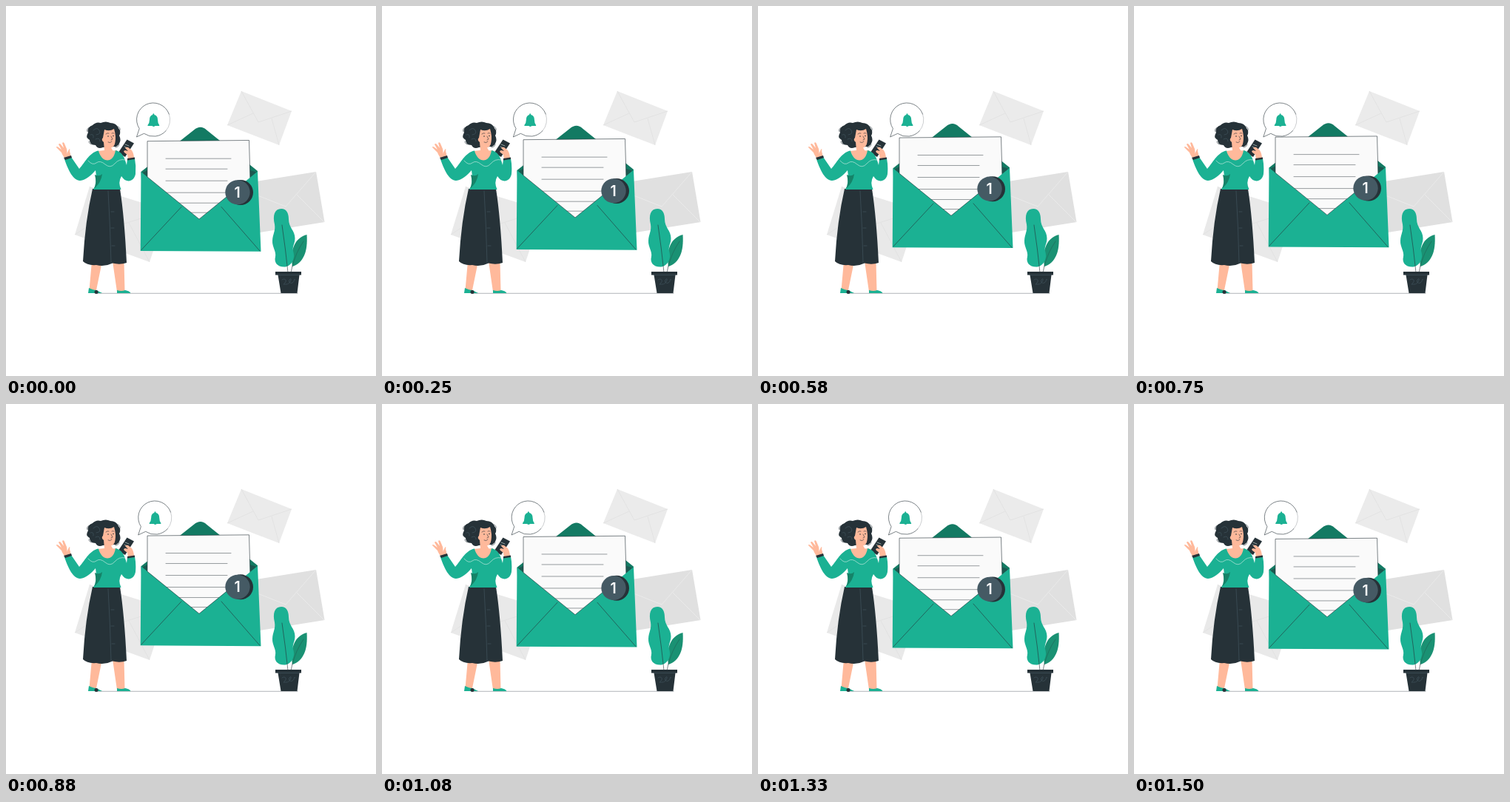
An HTML page for the animation above (1.54 s loop, 500x500 px).

```html
<!DOCTYPE html>
<html lang="en">
<head>
<meta charset="utf-8">
<title>New mail</title>
<style>
  html, body { margin: 0; height: 100%; overflow: hidden; background: #fff; }
  svg { display: block; width: 100vw; height: 100vh; }
  .line { fill: none; stroke: #263238; stroke-width: .6; stroke-linecap: round; stroke-linejoin: round; }
  .ink { fill: #263238; }
  .green { fill: #1bb193; }
  .skin { fill: #ffb99b; }
  .crease { fill: none; stroke: #ededed; stroke-width: .8; }
  .shade { stroke: #e0e0e0; }
  .dim { stroke: #455a64; }
  .pale { stroke: #d9efe8; }
</style>
</head>
<body>
<svg viewBox="0 0 500 500">
  <g id="backdrop">
    <path fill="#ebebeb" d="M318 115L386 142 369 188 299 161Z"/>
    <path class="crease shade" d="M318 115L341 157 386 142M299 161L334 145M369 188L359 152"/>
    <path fill="#e0e0e0" d="M332 238L419 224 430.500 292 343 306Z"/>
    <path class="crease" d="M419 224L378 271 335 254M430 292L393 255"/>
    <path fill="#e9e9e9" d="M113 244L217 276 194 346 93 309Z"/>
    <path class="crease shade" d="M113 244L151 297 217 276M194 346L166 293M93 309L138 279"/>
  </g>
  <path class="line" stroke-opacity=".6" d="M122 388.300H394"/>

  <g id="plant">
    <path class="line" d="M400 321Q389 338 385 360"/>
    <path fill="#1a9173" d="M406.500 309C408 332 402 347 387 352C384 333 388 314 406.500 309Z"/>
    <path class="line" stroke-opacity=".5" d="M402 318Q391 334 387 352"/>
    <path class="green" d="M372 274C379 274 382 280 382 288C382 300 390.500 303 390.500 314C390.500 322 386 325 388.500 333C391 342 385 352.500 376 352.500C366 352.500 362 346 364 339C365.500 331 359.500 326 360 317C360.500 308 364.500 304 363 295C360 283 363 274 372 274Z"/>
    <path class="line" d="M373 296Q378 330 381 360"/>
    <path class="ink" d="M364 359H399V363.500H396.500L393.500 388H371.500L367.500 363.500H364Z"/>
    <path class="line dim" d="M368 363.500H396M373 370C377 367 380 371 377 374S374 376 379 376S387 367 384 369S383 376 387 374S388 367 391 370"/>
  </g>

  <g id="woman">
    <path class="skin" d="M116 345H130L122 384H112.500ZM144 345H159.500L160.500 386H150Z"/>
    <path class="green" d="M112 381Q118 384 122 384L130 388H111ZM150 384Q156 386 161 384Q167 385 168.500 388H150Z"/>
    <circle class="ink" cx="122" cy="386.500" r="2.500"/>
    <path class="ink" d="M117 247H154Q160 285 163 347Q154 350 144 347.500Q133 353 122 350Q110 351 104 345Q107 290 117 247Z"/>
    <path class="line dim" d="M138 250Q141 300 142 347M142 278h4M142 300h4M143 324h4"/>
    <path class="skin" d="M88 204L80 207Q76 201 75 198L68 191Q68 189 71 191L75 194 71 187Q72 185 74 187L78 192 76 185Q78 183 79 186L82 193Q83 198 82 200L85 194Q87 191 86 196Z"/>
    <path class="ink" d="M163.500 180.500L173 185.500 161 204 151.500 198.500Z"/>
    <path class="line pale" d="M161 187l5 2M160 190l4 2"/>
    <path class="skin" d="M165 208L164 201 160 198Q158 196 161 195L165 196 161 192Q162 190 165 191L170 195Q173 200 173 207Z"/>
    <path class="ink" d="M117 161Q122 156 128 158Q135 155 141 158Q149 158 152 165Q156 170 153 175Q156 181 153 186Q150 191 146 190L131 191Q124 194 121 188Q113 188 113 181Q107 177 111 171Q109 164 117 161Z"/>
    <path class="line" d="M114 164q-6 1-4 6M112 180q-4-2-2-5M151 163q4 1 3 5M117 187q-5 0-5-4M153 187q-1 4-5 4"/>
    <path class="line dim" d="M118 168q5-5 8 0t-4 6M121 180q6-3 6 3M114 174q5-2 4 4"/>
    <path class="skin" d="M133 167Q140 170 146 166Q149 176 147.500 184Q146.500 191 142 191.500L144.500 195.500 150 195Q147 212 136 212Q125 211 124 196L133 195 132 184Q128 181 131 178Z"/>
    <path class="line" d="M135 173q2-2 4-1M143 172q2-1 3 0M142 176l2 4-2 1M138 184q3 2 5-1"/>
    <circle class="ink" cx="138" cy="176" r=".8"/><circle class="ink" cx="145" cy="175.500" r=".8"/>
    <path class="green" d="M125 195.500C112 198 106 213 99 220L88 204 79 207C84 222 91 236 100 236C108 235 115 229 121 222Q124 238 118 248H155.500Q151 238 156 230C162 240 173 238 175 227Q176 216 174 206L164 207 163 215C160 204 157 197 148 195C145 214 129 212 125 195.500Z"/>
    <path fill="#158368" d="M120 228Q126 231 130 227Q129 238 119 247Q123 239 120 228Z"/>
    <path class="ink" d="M78 205L88 202 89 205 80 208ZM164 206L174 204.500V207L164 208.500Z"/>
    <path class="line pale" d="M111 209Q117 216 122 212T134 214T147 213T161 208"/>
  </g>

  <g id="mail">
    <path fill="#137a63" d="M182.500 224L254 167.500Q263 160 271 167.500L340 223V236H183Z"/>
    <path class="ink" opacity=".45" d="M183 226L191 222V234ZM340 225L330 222V234Z"/>
    <path fill="#fafafa" d="M191 182.700L328.500 181.500 330 242 261 290 191 242Z"/>
    <path class="line" d="M191 231V182.700L328.500 181.500 330 232"/>
    <path class="line" stroke-opacity=".8" d="M216 206.200H304M216 220.200H299M216 236.200H299M214 252.200H299M230 266.200H291M246 279.200H274"/>
    <path class="green" d="M182.500 224L261 288 340 223.500 344.500 331.800 181.700 331Z"/>
    <path class="line" d="M191 231L261 288 306 251.500M183 329.500L237 271.500M343 331L291 271.500"/>
    <ellipse class="ink" cx="317" cy="252" rx="17" ry="17"/>
    <ellipse fill="#455a64" cx="313" cy="251.800" rx="16.700" ry="16.500"/>
    <text x="312.500" y="258.800" text-anchor="middle" font-family="Inter, sans-serif" font-weight="600" font-size="19.500" fill="#fff">1</text>
  </g>

  <g id="bubble">
    <circle fill="#fff" cx="199.300" cy="153.800" r="22.500"/>
    <path fill="#fff" d="M180 165.500L176.500 177 186.500 172.300Z"/>
    <path class="line" d="M220.300 146A22.500 22.500 0 1 0 180.200 165.700L176.500 177 186.500 172.300A22.500 22.500 0 0 0 216 168.800"/>
    <path class="line" stroke-opacity=".4" d="M220.300 146A22.500 22.500 0 0 1 216 168.800"/>
    <path class="green" d="M198.300 147V146Q199.300 144.500 200.300 146V147Q205 148 205 153.500Q205 158 207.200 161V162H201.500Q199.500 164 197.500 162H191.500V161Q194 158 194 153.500Q194 148 198.300 147Z"/>
  </g>
</svg>
<script>
const LOOP = 1540, PEAK = 720, LIFT = 5.8;
const shake = [0, -1, 2, -4, 4, -2.5, 4, -1.5, 1.5, -1, 0];
const mail = document.getElementById('mail');
const bubble = document.getElementById('bubble');

function draw() {
  const t = performance.now() % LOOP;
  const rise = t < PEAK ? t / PEAK : (LOOP - t) / (LOOP - PEAK);
  mail.setAttribute('transform', `translate(0 ${-LIFT * rise})`);

  const pos = t / LOOP * 10, i = Math.floor(pos);
  const x = shake[i] + (shake[i + 1] - shake[i]) * (pos - i);
  bubble.setAttribute('transform', `translate(${x} 0)`);
  requestAnimationFrame(draw);
}
draw();
</script>
</body>
</html>
```
